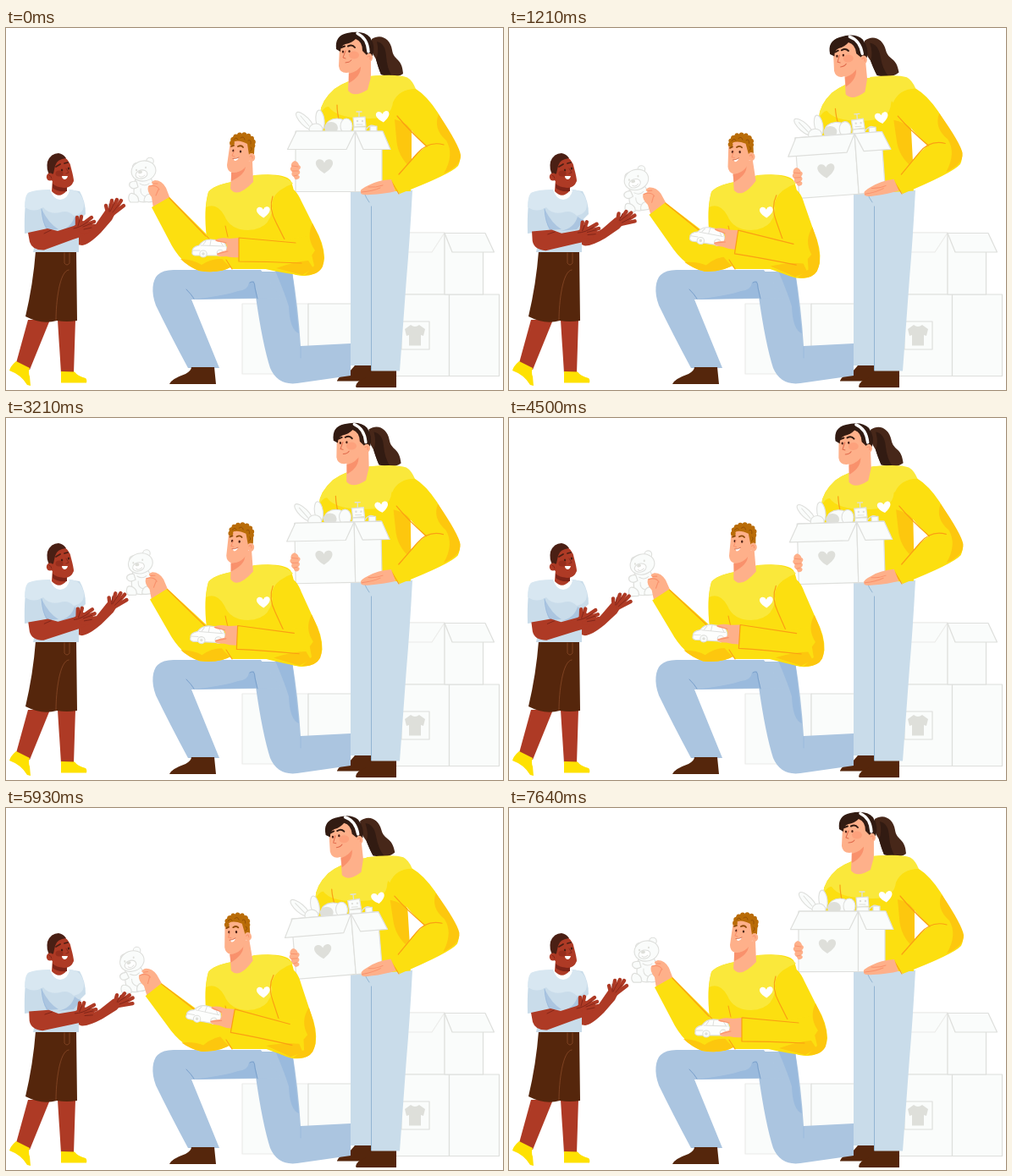
Write an HTML page with a canvas that moves like this. It is 587 by 428 pixels and loops after 7710 ms.

```html
<!DOCTYPE html>
<html lang="en">
<head>
<meta charset="utf-8">
<title>Sharing toys</title>
<style>
html, body { margin: 0; width: 100%; height: 100%; overflow: hidden; background: #fff; }
canvas { display: block; width: 587px; height: 428px; }
</style>
</head>
<body>
<canvas id="stage"></canvas>
<script>
const W = 587, H = 428, LOOP = 7710, STEPS = 108, CYCLE = LOOP / 2;
const canvas = document.getElementById('stage');
const ctx = canvas.getContext('2d');
const dpr = window.devicePixelRatio || 1;
canvas.width = W * dpr;
canvas.height = H * dpr;

const C = {
  paper: '#fafcfb', edge: '#dedfdc', faint: '#ececea', gray: '#dedfda',
  yellow: '#fcdf10', light: '#fae83b', amber: '#fdc70e', seam: '#fb9f13',
  peach: '#feb08a', blush: '#f9916c', ginger: '#b96c08', rust: '#8e4a06',
  jeans: '#abc5e0', denim: '#9abadd', sky: '#c9dcea', pale: '#d8e7f1',
  brown: '#55260c', hair: '#472719', deep: '#321b12',
  skin: '#ae3a25', shade: '#7e2418', ink: '#4a1f14'
};

function fill(d, color) {
  ctx.fillStyle = color;
  ctx.fill(new Path2D(d));
}
function line(d, color, w = 1) {
  ctx.strokeStyle = color;
  ctx.lineWidth = w;
  ctx.lineCap = ctx.lineJoin = 'round';
  ctx.stroke(new Path2D(d));
}
function shape(d, color = C.paper, edge = C.edge, w = 1.2) {
  fill(d, color);
  line(d, edge, w);
}
function oval(x, y, rx, ry, color, edge, tilt = 0) {
  ctx.beginPath();
  ctx.ellipse(x, y, rx, ry, tilt, 0, 7);
  ctx.fillStyle = color;
  ctx.fill();
  if (edge) {
    ctx.strokeStyle = edge;
    ctx.lineWidth = 1.1;
    ctx.stroke();
  }
}
function turn(deg, x, y, draw) {
  ctx.save();
  ctx.translate(x, y);
  ctx.rotate(deg * Math.PI / 180);
  ctx.translate(-x, -y);
  draw();
  ctx.restore();
}
function heart(x, y, size, tilt, color) {
  ctx.save();
  ctx.translate(x, y);
  ctx.rotate(tilt);
  ctx.scale(size, size);
  fill('M0 1C-1.6 0 -1.2 -.9 -.55 -.85Q-.15 -.8 0 -.4Q.15 -.8 .55 -.85C1.2 -.9 1.6 0 0 1Z', color);
  ctx.restore();
}

function crates() {
  shape('M279 326H357V409H279Z', C.paper, C.faint);
  shape('M357 326H440V409H357Z');
  shape('M436 242H518V315H436Z', C.paper, C.faint);
  shape('M436 242H518L503 265H436Z', C.paper, C.faint);
  shape('M436 315H523.5V411.5H436Z');
  shape('M523.5 315H582.5V411.5H523.5Z');
  shape('M518 242.5H563.5V315H518Z');
  shape('M518 242.5H566L576.5 265H527Z');
  shape('M467 347H500V380H467Z');
  fill('M478 351Q483 355 488 351L495 356L493 364L490 363V375.5H476V363L473 364L471 356Z', C.gray);
}

/* ---- child ---- */
function childHand(fingers) {
  for (const f of fingers) line(f, C.skin, 4.4);
}
function childFarArm(p) {
  fill('M84 246Q98 242 106 232L117 216L124 212L130 217L125 227L112 242Q98 256 90 257L84 256Z', C.skin);
  turn(12 * p, 119, 221, () => {
    childHand(['M120 218L118 210', 'M123 217L125 204', 'M124 218L131 203', 'M126 219L136 204', 'M126 220L139 210']);
    line('M123 217L128 207M126 218L133 209M122 217L122 208', C.shade, .8);
  });
}
function childNearArm() {
  fill('M26 242L49 237L61 240L80 234L90 228L102 231L103 238Q93 246 79 250L45 262.5Q31 263 28 253Z', C.skin);
  childHand(['M84 233L84 224', 'M87 232L89 223', 'M89 233L101 224', 'M91 234L104 229', 'M92 237L105 234', 'M88 240L97 240']);
  line('M80 237Q88 236 98 228M85 234L87 227M91 235L101 231M92 238L101 236M45 243L53 239', C.shade, .9);
}
function child(p) {
  fill('M26 345H52L28 404L12 396Z', C.skin);
  fill('M61 345H82L80 408H65Z', C.skin);
  fill('M12 394L28 402Q26 407 28 412L29 423L25 422Q18 410 4 405Q5 400 12 394Z', '#fee101');
  fill('M65 406L81 406.5Q84 411 94 414Q96 416 95 419.5H65Z', '#fee101');
  fill('M35 264H83L84 346Q72 348 60 346Q42 351 23 341Q32 303 35 264Z', C.brown);
  line('M59 345C59 325 63 287 74 286M69 266V278Q72 282 75 278V266', '#8a4a28', .8);

  turn(17 * p, 88, 252, () => childFarArm(p));
  fill('M36 193L54 191H74L87 193Q94 205 94 220L86 228V265H32L37 241L22 243Q21 208 26 195Z', C.sky);
  fill('M26 195Q33 191 52 191H76Q89 192 92 207Q93 219 80 222Q73 215 64 218Q51 221 44 212Q33 219 22 212Q22 199 26 195Z', C.pale);
  fill('M42 214Q43 230 48 239L62 238Q51 232 42 214Z', C.jeans);
  fill('M81 223Q77 237 61 240L80 238L89 227Q84 226 81 223Z', C.jeans);
  line('M42 214Q43 231 49 238', C.denim, .9);
  fill('M52 191Q56 203 64 203Q73 202 75 192L71 190H55Z', '#fff');
  fill('M55 179L54 193Q63 203 72 192L72 182Z', C.skin);
  fill('M55 184Q62 190 72 188V193Q60 194 55 189Z', C.shade);
  fill('M50 166Q54 154 65 151Q75 154 77 166Q80 177 80 181Q77 189 69 189Q59 187 53 179Z', C.skin);
  fill('M52 175Q47 167 49 158Q53 148 62 148Q68 149 71 154Q60 155 58 163L56 172Z', C.ink);
  oval(52, 176, 4.2, 4.6, C.skin);
  line('M51 174Q54 175 54 178', C.shade, .8);
  line('M59 164L64 161M69 160L73 159', C.ink, 1.8);
  oval(66, 168, 1.2, 1.5, C.ink);
  oval(74, 166, 1.2, 1.5, C.ink);
  line('M71 166L74 171L71 172', C.shade, .8);
  fill('M66 175L73 175Q72 179 69 179Q66 178 66 175Z', '#fff');
  oval(63, 172, 4.5, 3.5, '#972e1d');
  turn(8 * p, 38, 250, childNearArm);
}

/* ---- kneeling man ---- */
function bear() {
  oval(154.5, 164, 5, 4.5, C.paper, C.edge);
  oval(170, 157.5, 4.3, 4.3, C.paper, C.edge);
  shape('M153 178Q149 195 153 203Q163 209 174 202Q178 190 171 177Z');
  shape('M154 181Q144 181 146 187Q149 192 156 188Z');
  shape('M145 199Q146 193 153 197Q158 201 156 206L147 206Q144 203 145 199Z');
  shape('M163 205Q163 197 170 196Q178 197 177 204Q170 207 163 205Z');
  oval(162.5, 169, 14.5, 12, C.paper, C.edge, -.2);
  oval(160, 173, 7, 5, '#fff', C.edge, -.2);
  oval(158.5, 170.5, 2.5, 1.7, C.gray, null, -.2);
  oval(154, 168, 1, 1.3, C.gray);
  oval(165, 165, 1, 1.3, C.gray);
  line('M157 175Q160 178 164 174M158 184Q164 188 169 184M159 190Q158 197 164 199', C.edge);
}
function toyArm() {
  bear();
  fill('M174 213L172 200Q166 193 168 187L174 185Q169 182 176 180Q184 180 189 189L194 202Z', C.peach);
  line('M169 187Q178 185 181 191M174 184L179 184M180 191L177 198', C.blush, 1.1);
  fill('M193 200L238 245L266 270L267 282Q251 291 228 287Q206 279 192 250L172 212Z', C.yellow);
  fill('M267 282Q251 291 228 287Q215 282 206 273Q222 274 231 280Q247 269 266 275Z', C.amber);
  line('M193 201L236 246', C.seam, 1.2);
}
function car() {
  shape('M220 265Q219 259 228 257Q233 250 241 250L254 251Q260 253 261 263Q260 268 255 269L223 269Q219 268 220 265Z', '#fdfefd');
  line('M230 257L258 258M242 251L241 257M221 263H229M233 256L236 252M253 252L256 257', C.edge);
  oval(233, 267, 4.2, 4, C.paper, C.edge);
  oval(233, 267, 1.7, 1.7, C.gray);
  oval(253, 266, 3.8, 3.8, C.paper, C.edge);
}
function carArm() {
  car();
  fill('M276 248L264 249Q252 247 247 251Q250 254 258 253Q263 257 260 263Q254 264 249 267Q249 271 260 270Q268 272 276 271Z', C.peach);
  line('M248 251L260 254M250 267L262 264', C.blush, 1.1);
  fill('M275 247L330 250L356 246L364 281L352 293Q313 288 275 277Z', C.yellow);
  fill('M319 284Q341 276 357 275L363 284L350 292Z', C.amber);
  line('M275 248V276Q305 276 349 278M275 248L342 254', C.seam, 1.2);
}
function upperArm() {
  fill('M314 211Q315 195 328 190Q340 184 349 205L364 235Q376 255 376 272Q374 292 353 293Q334 293 322 279L330 249Z', C.yellow);
  fill('M362 231Q354 248 365 263Q357 278 335 290Q367 297 374 282Q380 265 362 231Z', C.amber);
  line('M315 199Q310 214 319 230L329 250', C.seam, 1.2);
}
function manHead() {
  fill('M267 158L265 190Q273 202 292 182L291 157Z', C.peach);
  fill('M266 171Q276 172 283 163Q283 173 266 181Z', C.blush);
  fill('M265 134L261 162Q261 169 267 171Q281 171 286 159L291 149L288 129L270 129Z', C.peach);
  fill('M266 135Q266 127 275 125L288 127Q295 134 293 149L287 150L285 137Q276 132 270 134Z', C.ginger);
  for (let i = 0; i < 9; i++) {
    const a = Math.PI + i * .43;
    oval(279.5 + 12.5 * Math.cos(a), 136 + 10 * Math.sin(a), 2.9, 2.9, C.ginger);
  }
  line('M269 132Q272 128 274 132M277 130Q281 127 282 132M286 133Q290 131 289 137M289 141Q292 143 288 146', C.rust, .8);
  oval(290, 153, 4.2, 5, C.peach);
  line('M288 152Q291 149 291 154', C.blush, 1);
  line('M266 140L269 139M274 140Q278 138 280 141', C.rust, 1.8);
  oval(268.5, 145, 1.2, 1.6, C.ink);
  oval(277, 146, 1.2, 1.6, C.ink);
  line('M270 144L267 151L270 152', C.blush, 1);
  fill('M268.5 154.5L275 153.5Q273 157 270 157Z', '#fff');
  line('M268 154.5Q272 155 275 153', '#c5553a', .7);
}
function man(p) {
  fill('M289 288H338Q345 329 348 376L407 373V411L344 420Q321 423 312 402Q303 374 295 318Z', C.jeans);
  fill('M318 287H338L346 361Q335 357 334 329Q329 313 318 287Z', C.denim);
  line('M348 377V390', C.denim);
  fill('M198 286H301L325 319L292 320L219 321L252 402H215Q193 361 177 328C171 312 173 298 179 292Q185 286 198 286Z', C.jeans);
  fill('M218 321Q256 317 274 311Q286 310 287 301L293 299L297 319Z', C.denim);
  line('M213 309Q219 315 222 320M288 301Q294 297 294 307L297 320', '#789fcb');
  fill('M193 421Q195 415 212 409Q219 405 219 401H246L248 421Z', C.brown);

  turn(-8.7 * p, 236, 266, toyArm);
  fill('M237 248Q233 214 239 194Q245 186 267 182L294 174Q328 171 336 180Q343 195 343 225L345 285H267Q247 266 237 248Z', C.yellow);
  fill('M239 194Q245 186 267 182L294 174Q328 171 339 184Q321 190 315 203Q317 238 286 239Q265 239 258 222Q249 206 236 212Q237 202 239 194Z', C.light);
  line('M259 234L262 247M237 246L244 254M260 274L267 285', C.seam, 1.1);
  turn(-7.5 * p, 280, 185, manHead);
  heart(304, 217.5, 7, -.05, '#fff');
  turn(8.5 * p, 325, 205, () => {
    upperArm();
    turn(1.7 * p, 360, 268, carArm);
  });
}

/* ---- woman ---- */
function womanHead() {
  fill('M432 13C443 6 454 13 456 26C458 39 468 35 469 54Q459 61 443 55Q440 48 437 37Q430 27 432 13Z', C.hair);
  fill('M438 16Q448 18 449 33Q450 48 456 57L443 55Q440 48 437 37Q441 29 438 16Z', C.deep);
  fill('M405 47L404 74Q411 83 427 73L431 58V36H420Z', C.peach);
  fill('M405 54Q417 51 419 44Q420 57 405 65Z', C.blush);
  fill('M394 23L393 45Q394 53 402 53Q416 52 422 42L429 36L425 10H400Z', C.peach);
  fill('M390 25Q388 9 403 6Q422 2 430 11Q437 22 433 33L427 33L421 27Q421 16 413 13Q408 18 401 19Q395 21 395 28Z', C.deep);
  line('M415 6.5Q427 12 428 28', '#fff', 3.4);
  oval(429, 35, 4, 5, C.peach);
  line('M427 34Q431 31 430 37', C.blush);
  oval(411, 32, 6, 4.5, '#fda17c');
  line('M396 23L400 21.5M404 21.5Q409 19 412 23', C.deep, 2);
  oval(398, 28, 1.2, 1.5, C.ink);
  oval(405.5, 27.5, 1.2, 1.5, C.ink);
  line('M401 27L398 35L401 36M401 41Q406 41 408 38', '#df694b', 1);
}
function womanTorso(p) {
  fill('M371 101Q372 86 388 72Q403 61 429 57Q455 55 470 60L486 85L478 115V193H407L371 130Z', C.yellow);
  fill('M371 101Q372 86 388 72Q403 61 429 57Q460 54 474 63Q462 72 457 88Q455 108 428 107Q390 107 381 93Q377 92 371 101Z', C.light);
  line('M391 91Q391 100 394 112', C.seam, 1.2);
  fill('M459 108Q471 111 479 119V166Q462 152 461 130Z', C.amber);
  turn(-2.6 * p, 425, 72, womanHead);
  heart(445, 104.5, 7, -.12, '#fff');
}
function womanArm() {
  fill('M430 57Q462 54 474 58.5Q480 62 484 72L457 88Z', C.light);
  fill('M457 88Q464 72 484 72Q497 80 510 100L531 137Q540 151 534 163Q525 173 465 196L455 181L484 150L496 140Q475 118 468 106Z', C.yellow);
  fill('M511 102Q504 119 520 133Q530 150 517 172Q538 163 537 150Q535 138 511 102Z', C.amber);
  line('M462 104Q475 120 497 140M517 138Q499 133 486 148L464 173M455 181L464 196', C.seam, 1.2);
}
function toys() {
  oval(353, 110, 5, 14, C.paper, C.edge, -.78);
  line('M348 104L358 116', C.edge);
  oval(371, 109, 5, 12, C.paper, C.edge, -.12);
  oval(366, 120, 8, 7, C.paper, C.edge);
  oval(391, 116, 13, 9, C.paper, C.edge);
  oval(402, 116, 7, 9, C.paper, C.edge);
  oval(384, 118, 8, 7, C.gray);
  shape('M411 117H425V130H409Z');
  shape('M410 106L424 105L425 116L411 117Z');
  line('M417 105V100M414 99H420M425 120Q431 112 437 117', C.edge, 1.3);
  oval(415, 110, 1.2, 1.2, C.gray);
  oval(421, 110, 1.2, 1.2, C.gray);
  line('M414 114H421', C.gray);
  shape('M430 116H438V124H430Z');
}
function parcel() {
  toys();
  shape('M342 122H412.5V193.5H342Z');
  shape('M412.5 122H444V193.5H412.5Z');
  shape('M343 122H412.5L402 143.5H332.5Z');
  shape('M412.5 122H445L454 143.5H422Z');
  heart(376, 163, 9, 0, C.gray);
  fill('M341 157Q336 159 337 164Q334 167 338 170Q336 174 340 176Q341 181 346 178Q348 175 345 174Q349 171 346 168Q350 164 346 162Q345 158 341 157Z', C.peach);
  line('M338 163L345 164M338 169L345 169M340 175L344 174', C.blush, .9);
  fill('M455 179Q439 180 428 186Q417 191 419 194Q418 198 430 197Q448 196 460 193Z', C.peach);
  line('M420 194Q433 193 442 189M428 188Q437 189 445 186', C.blush, 1);
}
function woman(p) {
  fill('M391 417Q393 411 406 406L412 399H432V417.5H391Z', C.brown);
  fill('M413 424Q414 417 424 414L432 405H461L461 425H414Z', C.brown);
  fill('M407 192H480Q477 249 473 296L465 405.5H432V399H407Z', C.sky);
  line('M431.5 211V405M423 195Q426 202 429 206', '#93b5d2', 1);
  turn(-3.6 * p, 470, 195, () => womanTorso(p));
  turn(-2 * p, 465, 195, womanArm);
  turn(-4.8 * p, 450, 185, parcel);
}

function glide(x) {
  return (1 - Math.cos(Math.PI * Math.min(1, Math.max(0, x)))) / 2;
}
// Lean forward, pause briefly, then ease back.
function lean(t) {
  return t < 1600 ? glide(t / 1600) : 1 - glide((t - 1930) / (CYCLE - 1930));
}
function render(now) {
  const tick = LOOP / STEPS;
  const t = Math.floor((now % LOOP) / tick + .1) * tick;
  const p = lean(t % CYCLE);
  ctx.setTransform(dpr, 0, 0, dpr, 0, 0);
  ctx.fillStyle = '#fff';
  ctx.fillRect(0, 0, W, H);
  crates();
  woman(p);
  man(p);
  child(p);
}

let start;
function play(now) {
  start ??= now;
  render(now - start);
  requestAnimationFrame(play);
}
render(0);
requestAnimationFrame(play);
</script>
</body>
</html>
```
